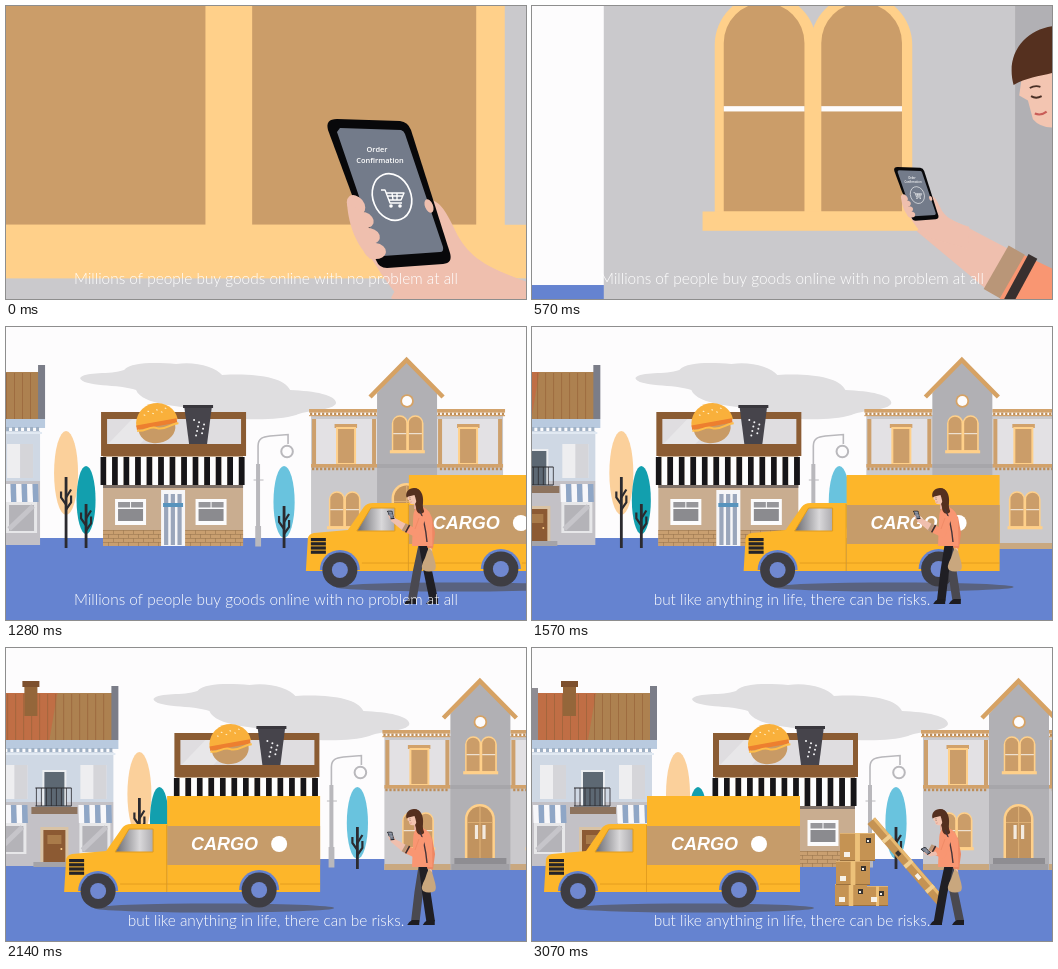
Recreate the animation shown at these times as an HTML page with a canvas. Size 520 px wide and 293 px high, loop 3140 ms.

```html
<!DOCTYPE html>
<html lang="en">
<head>
<meta charset="utf-8">
<title>Shopping online</title>
<style>
html, body { margin: 0; width: 100%; height: 100%; overflow: hidden; background: #fdfcfd; }
canvas { display: block; width: 100vw; height: 100vh; }
</style>
</head>
<body>
<canvas id="stage" width="520" height="293"></canvas>
<script>
const c = document.getElementById('stage').getContext('2d');
const LOOP = 3140, STEP = LOOP / 44;
const TAN = '#cb9d69', CREAM = '#ffd08a', WALL = '#cac9cc', TOWER = '#b1b0b4', SKIN = '#efbfae';
const CORAL = '#f99672', AMBER = '#fdb62a', INK = '#2b2a2f', STREET = '#6583d0';

// Smooth monotone curve through [time, value] points
function track(pts) {
  const n = pts.length - 1;
  const d = pts.slice(1).map((p, i) => (p[1] - pts[i][1]) / (p[0] - pts[i][0]));
  const m = pts.map((p, i) => i && i < n && d[i - 1] * d[i] > 0 ? 2 * d[i - 1] * d[i] / (d[i - 1] + d[i]) : 0);
  return t => {
    if (t <= pts[0][0]) return pts[0][1];
    if (t >= pts[n][0]) return pts[n][1];
    let i = 0;
    while (t > pts[i + 1][0]) i++;
    const h = pts[i + 1][0] - pts[i][0], u = (t - pts[i][0]) / h, v = 1 - u;
    return v * v * (1 + 2 * u) * pts[i][1] + u * u * (3 - 2 * u) * pts[i + 1][1]
      + h * u * v * (v * m[i] - u * m[i + 1]);
  };
}
const depth = track([[0, .0578], [285, .074], [571, .1605], [700, .31], [856, .559], [1284, 1]]);
const panX = track([[0, 426.7], [571, 421.2], [856, 401.7], [1284, 346], [1855, 293], [2426, 261.5], [3068, 260]]);
const truckX = track([[0, 800], [571, 625], [856, 524], [1284, 386], [1855, 159], [2426, 21.5], [3068, 12]]);
const armDrop = track([[2450, 0], [2950, 1]]);

function rect(x, y, w, h, col) { c.fillStyle = col; c.fillRect(x, y, w, h); }
function oval(x, y, rx, ry, col, rot = 0) {
  c.beginPath(); c.ellipse(x, y, rx, ry, rot, 0, 7); c.fillStyle = col; c.fill();
}
function shape(d, col) { c.fillStyle = col; c.fill(new Path2D(d)); }
function line(d, col, w) { c.strokeStyle = col; c.lineWidth = w; c.stroke(new Path2D(d)); }
function at(x, y, draw, sx = 1, sy = sx) {
  c.save(); c.translate(x, y); c.scale(sx, sy); draw(); c.restore();
}

function cloud() {
  shape('M160 51C166 44 190 48 204 43C212 34 240 36 256 37C275 34 296 40 302 48C335 46 364 50 370 63C395 64 416 68 416 76C414 84 385 83 376 88C352 95 300 94 284 82C262 80 222 78 216 63C200 57 162 60 160 51Z', '#dfdee0');
}

function tree(x, y, rx, ry, col) {
  oval(x, y, rx, ry, col);
  line(`M${x} ${y + 4}V221`, INK, 2.8);
  const b = y + ry * .75;
  line(`M${x} ${b}l-5 -7v-6M${x} ${b - 7}l5 -8M${x} ${b + 5}l5 -7v-7`, INK, 2.2);
}

function lamp() {
  const g = '#b9b8bc';
  line('M338 140V119C338 111 343 110 350 109L368 107.5V117', g, 1.6);
  line('M333.5 153H343.5', g, 1);
  rect(336, 137, 4, 64, g);
  rect(335.2, 199, 5.8, 20.5, g);
  c.beginPath(); c.arc(367, 124.5, 5.8, 0, 7);
  c.strokeStyle = g; c.lineWidth = 2; c.stroke();
}

function townhouse() {
  rect(0, 104, 120, 50, '#cfd8e4');
  rect(0, 154, 120, 64, '#c3c1c6');
  rect(0, 40, 6, 53, '#8f8d94');
  rect(6, 45, 113, 47, '#ad8150');
  shape('M6 45H64L56 92H6Z', '#c06e45');
  for (let x = 14; x < 118; x += 8) rect(x, 46, .7, 46, '#98643a');
  rect(118, 38, 7, 54, '#7b7d88');
  rect(31, 38, 13, 30, '#94663a');
  rect(29, 33, 17, 6, '#7d502e');
  rect(0, 92, 125, 9, '#b9cadf');
  for (let x = 2; x < 122; x += 6) rect(x, 100, 3, 4, '#9fb0c4');
  rect(0, 105, 122, 2, '#e1e9f2');
  for (const x of [8, 87]) {
    rect(x, 117, 26, 34, '#eeeef0');
    rect(x + 13, 117, 13, 34, '#d5d5d9');
  }
  rect(49, 122, 24, 36, '#eceef1');
  rect(51, 124, 20, 34, '#5d6873');
  line('M42 140H78M42 158H78', INK, 1.2);
  for (let x = 43; x < 79; x += 5) line(`M${x} 140V158`, INK, .8);
  rect(38, 159, 46, 7, '#8d735e');
  for (const x of [0, 84]) {
    rect(x + 2, 175, 31, 31, '#e7e7e9');
    rect(x + 5, 178, 25, 26, '#b4b3b8');
    line(`M${x + 5} 202L${x + 29} 179`, '#c6c5ca', 5);
    for (let i = 0; i < 6; i++) shape(`M${x + 1 + i * 5.5} 157h5.5l.5 18h-5.5z`, i % 2 ? '#8fa6c6' : '#f7f7fa');
  }
  rect(47, 179, 28, 37, '#d9c3a5');
  rect(50, 182, 22, 34, '#8c5a33');
  rect(54, 187, 14, 9, '#a97b4a');
  oval(68, 201, 1, 1, CREAM);
  rect(40, 214, 42, 5, '#a4a3a8');
}

function bricks(x, w) {
  rect(x, 203, w, 16, '#c99f70');
  for (let r = 0; r < 4; r++) {
    rect(x, 203 + r * 4, w, .6, '#9c7850');
    for (let i = r % 2 ? 5 : 10; i < w; i += 10) rect(x + i, 203 + r * 4, .6, 4, '#9c7850');
  }
}

function food() {
  c.save(); c.translate(237, 96); c.rotate(-.18);
  oval(-1, 5, 18.5, 15, '#c89a65');
  c.beginPath(); c.ellipse(0, 0, 21, 20, 0, Math.PI, 0); c.fillStyle = '#f9b03b'; c.fill();
  line('M-21 1H20', '#ed7f2f', 4.5);
  line('M-21 4C-13 7 -8 1 -1 5S13 3 21 4', '#ffbe4a', 2);
  for (let i = 0; i < 6; i++) oval(-11 + i * 4.4, -10 - (i % 2) * 3, 1, .6, '#fff0c8', .5);
  c.restore();
  shape('M264 78H292L287 117H269Z', '#46444b');
  rect(263, 78, 30, 3, '#39373d');
  for (let i = 0; i < 8; i++) oval(274 + (i * 5) % 11, 93 + i * 2.2, 1, 1, '#f4f4f6');
}

function shop() {
  rect(181, 85, 145, 44, '#8b5c33');
  rect(187, 92, 134, 25, '#dfdde0');
  shape('M188 117L212 92H244L220 117Z', '#e8e7e9');
  rect(183, 129, 140, 90, '#c9ad90');
  rect(183, 157, 140, 4, '#7f7168');
  for (let i = 0; i < 25; i++) rect(180.5 + i * 5.76, 130, 5.8, 28, i % 2 ? '#fdfdfd' : '#161518');
  bricks(183, 58); bricks(265, 58);
  rect(241, 163, 24, 56, '#f6f6f8');
  for (let i = 0; i < 3; i++) rect(244 + i * 6.7, 167, 4.2, 51, '#9aa6bb');
  rect(243, 176, 20, 4, '#5793bd');
  for (const x of [195, 275.5]) {
    rect(x, 172, 31, 26, '#fbfbfc');
    rect(x + 3, 175, 12, 5.5, '#97979b');
    rect(x + 16, 175, 12, 5.5, '#97979b');
    rect(x + 3, 182, 25, 12, '#8b8b8f');
  }
  food();
}

function arch(x, top, w, bottom, col) {
  const r = w / 2;
  c.beginPath(); c.moveTo(x, bottom); c.lineTo(x, top + r);
  c.arc(x + r, top + r, r, Math.PI, 0); c.lineTo(x + w, bottom);
  c.fillStyle = col; c.fill();
}

function twin(cx, dy) {
  at(cx, dy, () => {
    for (const x of [-15.85, -.5]) arch(x, 164.3, 16.35, 200, CREAM);
    for (const x of [-14.4, 1.25]) {
      arch(x, 165.7, 12.95, 199.2, TAN);
      rect(x, 182.3, 12.95, .85, '#fdfcfd');
    }
    rect(-17.8, 199.2, 35, 3.1, CREAM);
  });
}

function cornice(x, w, y) {
  rect(x, y, w, 3.6, '#d2a26b');
  for (let i = 1; i < w - 2; i += 4) rect(x + i, y + 3.6, 2.2, 2.6, '#bd8d58');
}

function wing() {
  rect(391, 88, 67, 134, WALL);
  rect(393, 92, 64, 46, '#e3e1e4');
  for (const x of [392, 452]) rect(x, 92, 4, 46, '#cda06d');
  cornice(389, 68, 82);
  rect(389, 88, 68, 1.2, '#d2a26b');
  cornice(391, 66, 137);
  rect(414.5, 97, 22.5, 4, '#d2a26b');
  rect(416, 100, 20, 37, CREAM);
  rect(418, 102, 16, 34, TAN);
  rect(391, 216, 67, 6, '#c9a880');
  twin(424.65, 0);
}

function hall() {
  wing();
  at(974, 0, wing, -1, 1);
  shape('M457 222V66L487 32L517 66V222Z', TOWER);
  line('M450 70L486.5 33L523 70', '#d6a264', 4.5);
  oval(487, 74, 6.8, 6.8, '#d6a264');
  oval(487, 74, 5, 5, '#fdfcfd');
  twin(487.6, -76);
  rect(457, 137, 60, 4, '#a7a6aa');
  arch(471.5, 156, 30, 211, CREAM);
  arch(474, 158.5, 25, 211, '#c1935f');
  rect(474, 174, 25, 1, '#dcae74');
  rect(486, 158.5, 1.2, 52, '#dcae74');
  for (const x of [481.5, 489]) rect(x, 177, 3.2, 14, '#f3eadf');
  rect(461, 210, 52, 6, '#8e8d92');
  rect(458, 216, 58, 6, '#a09fa4');
}

function wheel(x, y) {
  c.beginPath(); c.arc(x, y, 20, Math.PI, 0); c.fillStyle = STREET; c.fill();
  oval(x, y, 17.5, 17.5, '#3e3d43');
  oval(x, y, 8, 8, '#7088d0');
}

function truck() {
  oval(150, 260, 120, 4.5, '#59627f');
  rect(103, 148, 153, 96, AMBER);
  rect(103, 178, 153, 39, '#c69c6a');
  shape('M0 244L2 211Q3 207 8 206L42 203L58 180Q61 176 67 176H103V244Z', AMBER);
  const g = c.createLinearGradient(54, 0, 90, 0);
  g.addColorStop(0, '#77777c'); g.addColorStop(.6, '#d9d8da'); g.addColorStop(1, '#a9a8ac');
  shape('M51 204L65 181H89V204Z', g);
  line('M51 204L65 181H89V204Z', '#e19c1c', 1);
  line('M102.5 177V244M56 236H176M216 236H256', '#dd991c', .8);
  for (let i = 0; i < 4; i++) rect(5, 211 + i * 4.2, 15, 3.2, '#242328');
  wheel(34, 243); wheel(195, 242);
  c.fillStyle = '#fff';
  c.textAlign = 'left';
  c.font = 'italic bold 18px "Liberation Sans", Arial, sans-serif';
  c.fillText('CARGO', 127, 202);
  oval(215, 196, 8, 8, '#fff');
}

function box(x, y, w, h) {
  rect(x, y, w, h, '#c59353');
  rect(x, y, w, 1, '#dfb273');
  rect(x, y + h - 1, w, 1, '#99703e');
  rect(x + w * .43, y, w * .14, h, '#edc179');
  rect(x + 4, y + h - 9, 6, 5, '#f7f2e8');
  rect(x + w - 9, y + 5, 5, 5, '#38332f');
  rect(x + w - 8, y + 7, 2, 2, '#f7f2e8');
}

function parcels(t) {
  const fall = (start, h) => {
    const u = Math.min(1, (t - start) / 210);
    return u < 0 ? null : -h * (1 - u * u);
  };
  [[303, 236, 32, 22], [335, 238, 21, 20], [304, 213, 34, 24], [308, 185, 35, 28]].forEach((b, i) => {
    const dy = fall(2500 + i * 100, 90);
    if (dy !== null) box(b[0], b[1] + dy, b[2], b[3]);
  });
  const dy = fall(2850, 85);
  if (dy === null) return;
  c.save(); c.translate(340, 172 + dy); c.rotate(.86);
  rect(0, -4, 108, 10, '#c59353');
  rect(0, -4, 108, 3, '#e8b970');
  for (const x of [22, 55, 88]) rect(x, -4, 4, 10, '#f1cf91');
  rect(40, 0, 5, 4, '#38332f');
  rect(70, 0, 6, 4, '#f7f2e8');
  c.restore();
}

// Drawn at close-up size, origin at the phone's middle
function phone() {
  c.translate(-385, -188);
  shape('M420 194C433 192 440 205 452 230C465 252 480 262 530 279L528 340L404 306C388 285 376 270 371 261L350 230Z', SKIN);
  shape('M331 113L394 115Q402 116 405 124L444 247Q447 257 437 258L381 262Q373 262 370 254L322 124Q319 113 331 113Z', '#08080a');
  shape('M334 122L395 124Q398 125 399 128L437 241Q438 246 434 246L377 250Q373 250 372 246L331 126Z', '#737b8a');
  c.fillStyle = '#fff';
  c.textAlign = 'center';
  c.font = '600 7.4px "Open Sans", sans-serif';
  c.fillText('Order', 371, 146);
  c.fillText('Confirmation', 374, 157);
  c.beginPath(); c.ellipse(386, 191, 19, 24, -.38, 0, 7);
  c.strokeStyle = '#fff'; c.lineWidth = 1.7; c.stroke();
  line('M375 184H379L384 197H396M380 187H398L395 194H383M386 187L387 194M391 187V194M381 190H397', '#fff', 1.4);
  oval(385, 200, 1.8, 1.8, '#fff'); oval(394, 200, 1.8, 1.8, '#fff');
  [[350, 199, .9], [357, 214, .3], [363, 230, .2], [369, 245, .1]].forEach(([x, y, r]) => oval(x, y, 11, 8, SKIN, r));
  shape('M341 196C342 214 347 235 364 253L374 250L352 203Z', SKIN);
  oval(423, 200, 4, 7, SKIN, -.4);
}

function leg(foot, lift, col) {
  const knee = 31 + (foot - 31) * .5 - lift * .5, y = 88 - lift;
  line(`M32 29L${knee} 57L${foot} ${y - 2}`, col, 8.5);
  shape(`M${foot + 4} ${y - 4}V${y + 1}H${foot - 8}Q${foot - 7} ${y - 2} ${foot - 3} ${y - 4}Z`, '#1d1c20');
}

function woman(t) {
  const k = armDrop(t), hx = 9 * k, hy = 15 * k;
  const p = (Math.min(t, 2426) - 1855) / 571 * Math.PI * 1.5;
  const swing = Math.sin(p) * 11, lift = Math.max(0, Math.cos(p)) * 3;
  c.lineJoin = 'round';
  leg(32 - swing, lift, '#4a4950');
  leg(32 + swing, 0, '#201f24');
  line('M38 2L41 18L39 33', '#ee8763', 6);
  oval(39, 36, 2.2, 3, SKIN);
  shape('M36 37L38 33L41 36L43 43Q46 52 44 55Q38 58 32 55Q29 52 34 43Z', '#c9a77e');
  shape('M25.5 -8L32 -8Q39 -5 41 4L41.5 31H21L22 6Q22 -4 25.5 -8Z', CORAL);
  rect(23, -14, 6, 8, '#e5ae9c');
  // head
  shape('M22 -26C28 -28 33 -22 32 -12C31 -5 35 -4 32 -2C28 0 25 -3 25 -8L22 -18Z', '#55301f');
  shape('M17 -20L16.4 -15.8L17.8 -15L18.6 -12Q20.3 -10 24 -11L27 -16L25 -22Z', '#f3c5b1');
  shape('M15.5 -17.5C14 -23 18 -27 23 -27C30 -27 32 -19 30 -12L27 -9C25 -13 25 -16 23.5 -20C21 -19 18 -19 15.5 -17.5Z', '#55301f');
  line('M18.1 -17Q18.9 -17.5 19.8 -17.2M18.3 -15.7Q19.1 -15.2 20 -15.7', '#493026', .3);
  line('M18.9 -12.9Q19.9 -12.5 20.8 -13.2', '#c95d58', .35);
  line('M28 -6Q34 5 36 27', '#45353a', 1.4);
  // arm and phone
  shape(`M${2 + hx} ${2.5 + hy}L${7.6 + hx * .6} ${5.1 + hy * .6}L16 9.5L12 16L${hx} ${6 + hy}Z`, SKIN);
  line('M15 13.2L25 18L31 1', CORAL, 8);
  line('M24 14L28 3', '#e98460', .6);
  line('M16 9L12 16', '#b99678', 3);
  line('M18.6 10L14.6 17.4', '#38302f', 1.6);
  at(hx, hy, () => { c.rotate(-.5 * k); phone(); }, 1 / 17.3);
}

function caption(t) {
  c.fillStyle = '#fff';
  c.textAlign = 'center';
  c.font = '300 15.4px Lato, sans-serif';
  c.fillText(t < 1565
    ? 'Millions of people buy goods online with no problem at all'
    : 'but like anything in life, there can be risks.', 260, 278);
}

function draw(t) {
  const d = depth(t), s = 1 / d;
  rect(0, 0, 520, 293, '#fdfcfd');
  c.save();
  c.translate(260, 146.5); c.scale(s, s); c.translate(-panX(t), 51.5 * d - 198);
  cloud();
  rect(-400, 211, 1600, 300, STREET);
  tree(146, 146, 12, 42, '#fbd09b');
  tree(166, 173, 9.5, 34, '#129fae');
  townhouse();
  shop();
  lamp();
  tree(364, 175, 10.6, 36, '#69c3de');
  hall();
  at(truckX(t), 0, truck);
  parcels(t);
  c.restore();
  at(385, 188, () => woman(t), s);
  caption(t);
}

// The picture moves in 44 even steps; the small lead absorbs timer rounding
function tick(now) {
  const i = Math.floor((now % LOOP + 8) / STEP) % 44;
  draw(i * STEP);
  requestAnimationFrame(tick);
}
requestAnimationFrame(tick);
</script>
</body>
</html>
```
